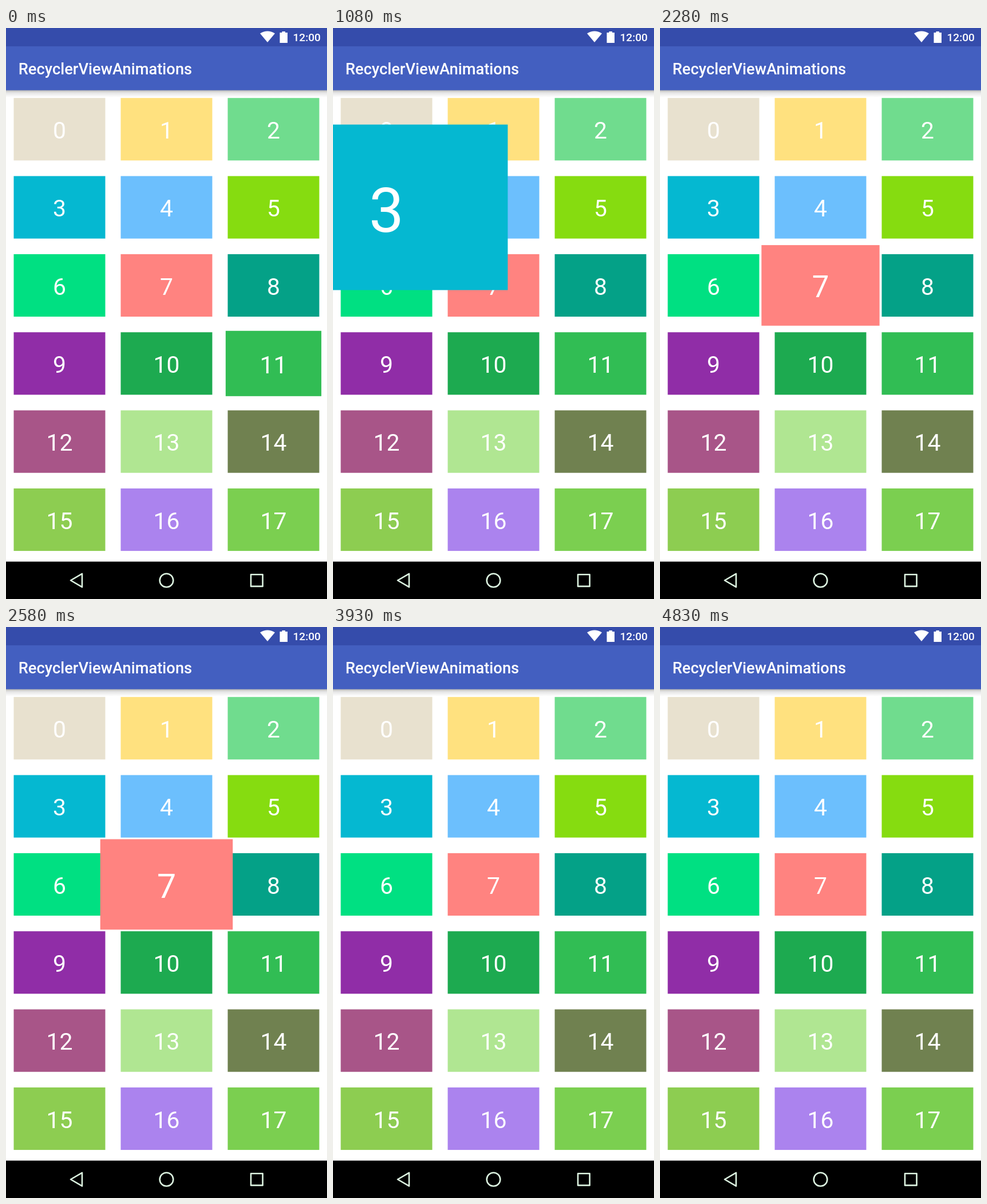
These frames come from a looping animation (561x997 px, 4.86 s). An HTML page:

```html
<!DOCTYPE html>
<html lang="en">
<head>
<meta charset="utf-8">
<title>Grid animations</title>
<style>
  html, body { margin: 0; width: 100%; height: 100%; overflow: hidden; background: #fff; }
  svg { display: block; width: 561px; height: 997px; }
  text { font-family: Roboto, sans-serif; fill: #fff; }
  .cell text { font-size: 40.9px; text-anchor: middle; }
  .medium { font-weight: 500; }
  .nav { fill: none; stroke: #dcf3e0; stroke-width: 2.6; stroke-linejoin: round; }
</style>
</head>
<body>
<svg viewBox="0 0 561 997">
  <defs>
    <linearGradient id="shade" x2="0" y2="1">
      <stop offset="0" stop-color="#000" stop-opacity=".27"/>
      <stop offset=".4" stop-color="#000" stop-opacity=".1"/>
      <stop offset="1" stop-color="#000" stop-opacity="0"/>
    </linearGradient>
  </defs>
  <rect width="561" height="997" fill="#fff"/>
  <rect y="108" width="561" height="13" fill="url(#shade)"/>
  <g id="grid"></g>
  <rect y="108" width="561" height="3" fill="url(#shade)" opacity=".5"/>

  <rect width="561" height="108.6" fill="#435fc0"/>
  <rect width="561" height="32" fill="#354cab"/>
  <path d="M444 9.5Q457 1.500 470 9.500L457 25Z" fill="#fff"/>
  <path d="M482.500 6h5.500v2h4v18h-13.500v-18h4z" fill="#fff"/>
  <text class="medium" x="501.500" y="23.300" font-size="19.1">12:00</text>
  <text class="medium" x="21.800" y="81" font-size="27.3">RecyclerViewAnimations</text>

  <rect y="931.7" width="561" height="66" fill="#000"/>
  <g class="nav">
    <path d="M113 964.500L133 952.800V976.200Z"/>
    <circle cx="280.500" cy="964.500" r="11.800"/>
    <rect x="428" y="954.300" width="20.600" height="20.600"/>
  </g>
</svg>
<script>
const LOOP = 4860, HALF = 218;
const WIDTH = 160, HEIGHT = 109.1;
const colors = ['#e8e1cf', '#ffe17f', '#70dc8e', '#05b8d1', '#6cbffd', '#86dc10',
  '#00e082', '#ff8380', '#04a187', '#902da7', '#1daa50', '#31bd54',
  '#a85588', '#b0e692', '#708150', '#8dcd51', '#ab83ee', '#7bcf50'];

// Each pulse grows one cell and shrinks it again.
const pulses = [
  { cell: 11, start: -21, peak: 3 },
  { cell: 3, start: 802, peak: 3 },
  { cell: 1, start: 1342, peak: 3 },
  { cell: 7, start: 2220, peak: 2.65 },
  { cell: 10, start: 2962, peak: 3 },
  { cell: 15, start: 4012, peak: 3 }
];

const grid = document.getElementById('grid');

function make(parent, tag, attrs) {
  const node = document.createElementNS('http://www.w3.org/2000/svg', tag);
  for (const key in attrs) node.setAttribute(key, attrs[key]);
  return parent.appendChild(node);
}

const cells = colors.map((fill, i) => {
  const x = 93.5 + 187 * (i % 3);
  const y = 176.75 + 136.35 * Math.floor(i / 3);
  const node = make(grid, 'g', { class: 'cell' });
  make(node, 'rect', { x: -WIDTH / 2, y: -HEIGHT / 2, width: WIDTH, height: HEIGHT, fill });
  make(node, 'text', { y: 16.2 }).textContent = i;
  return { node, x, y };
});

function place({ node, x, y }, scale) {
  node.setAttribute('transform', `translate(${x} ${y}) scale(${scale})`);
}

function draw(now) {
  const time = now % LOOP;
  cells.forEach(cell => place(cell, 1));
  for (const { cell, start, peak } of pulses) {
    const phase = (time - start) / HALF;
    if (phase <= 0 || phase >= 2) continue;
    place(cells[cell], 1 + (peak - 1) * (1 - Math.cos(Math.PI * phase)) / 2);
    if (grid.lastChild !== cells[cell].node) grid.appendChild(cells[cell].node);
  }
}

let origin;
function tick(now) {
  origin ??= now;
  draw(now - origin);
  requestAnimationFrame(tick);
}
draw(0);
requestAnimationFrame(tick);
</script>
</body>
</html>
```
